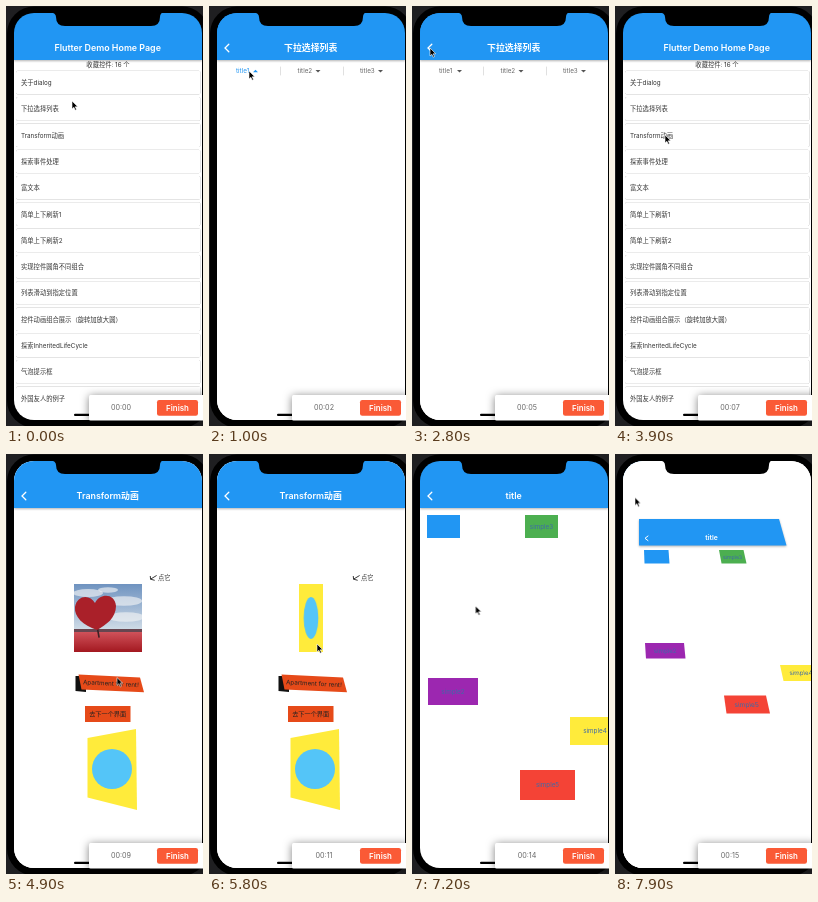
Animation, 197 px wide and 420 px high, one loop 8 s. Source, as an HTML page:

```html
<!DOCTYPE html>
<html lang="zh-CN">
<head>
<meta charset="utf-8">
<title>Widget demo</title>
<style>
  html, body { margin: 0; width: 100%; height: 100%; overflow: hidden; background: #1f1f21; }
  #stage { display: block; width: 197px; height: 420px; }
  text { font-family: Inter, "Noto Sans CJK SC", "Noto Sans CJK", sans-serif; white-space: pre; }
  .bar { filter: drop-shadow(0 1px 1px rgba(0, 0, 0, .3)); }
  .card { filter: drop-shadow(0 .7px .7px rgba(0, 0, 0, .42)); }
  .panel { filter: drop-shadow(0 1px 4px rgba(0, 0, 0, .5)); }
</style>
</head>
<body>
<svg id="stage" viewBox="0 0 197 420"></svg>
<script>
const LOOP = 8000, STEP = 100;
const BLUE = '#2196f3', YELLOW = '#ffeb3b', ORANGE = '#e64a19', SKY = '#54c5f8';

// Drawing helpers; text is placed by its vertical centre.
const text = (x, y, s, { size = 6.3, fill = '#333', anchor = 'start', weight = 400, more = '' } = {}) =>
  `<text x="${x}" y="${y + size * .36}" font-size="${size}" fill="${fill}" text-anchor="${anchor}" font-weight="${weight}" ${more}>${s}</text>`;
const mid = (x, y, s, opts) => text(x, y, s, { anchor: 'middle', ...opts });
const rect = (x, y, w, h, fill, more = '') =>
  `<rect x="${x}" y="${y}" width="${w}" height="${h}" fill="${fill}" ${more}/>`;
const poly = (points, fill, more = '') => `<polygon points="${points}" fill="${fill}" ${more}/>`;
const line = (d, color, width = 1) =>
  `<path d="${d}" fill="none" stroke="${color}" stroke-width="${width}" stroke-linecap="round"/>`;
const group = (id, body) => `<g id="${id}">${body}</g>`;
const blank = rect(8, 7, 188, 407, '#fff');

function header(title, back = true) {
  return rect(8, 7, 188, 47, BLUE, 'class="bar"') +
    mid(101.7, 42, title, { size: 8.9, fill: '#fff', weight: 600 }) +
    (back ? line('M19.8 38.2L16 42L19.8 45.8', '#fff', 1.3) : '');
}

function homePage() {
  const items = ['关于dialog', '下拉选择列表', 'Transform动画', '探索事件处理', '富文本', '简单上下刷新1',
    '简单上下刷新2', '实现控件圆角不同组合', '列表滑动到指定位置', '控件动画组合展示（旋转加放大圆）',
    '探索InheritedLifeCycle', '气泡提示框', '外国友人的例子'];
  return blank + mid(102, 59, '收藏控件: 16 个') +
    items.map((label, i) => {
      const y = 76.8 + i * 26.3;
      return rect(10, y - 12, 184.5, 23.6, '#fff', 'rx="1.8" class="card"') + text(15, y, label);
    }).join('') + header('Flutter Demo Home Page', false);
}

function cells(top, labels, picked) {
  return labels.map((label, i) => {
    const x = i % 2 ? 104 : 12, y = top + (i >> 1) * 33.2;
    const on = picked.includes(i);
    return rect(x, y, 88, 29, '#fff', `stroke="${on ? '#6bb3e0' : '#999'}" stroke-width=".7"`) +
      mid(x + 44, y + 14.7, label, { fill: on ? '#3a9fdc' : '#888' });
  }).join('');
}

function choicePage() {
  const series = (name, n) => ['全部', ...Array.from({ length: n }, (_, i) => name + (i + 1))];
  const arrow = (x, up) => up ? poly(`${x - 2.5},66.3 ${x + 2.5},66.3 ${x},63.7`, BLUE)
    : poly(`${x - 2.5},63.9 ${x + 2.5},63.9 ${x},66.5`, '#555');
  const tabs = [27, 88.5, 151].map((x, i) =>
    text(x, 65, 'title' + (i + 1), { fill: '#666' }) + arrow(x + 20.5)).join('');
  const panel = rect(8, 75, 188, 339, '#fff') +
    text(15, 88, '选择1', { size: 7.2 }) + cells(104, series('问题', 8), [5, 6, 7]) +
    text(15, 282.5, '选择2', { size: 7.2 }) + cells(299, series('测试', 5), [4, 5]) +
    rect(8, 391.5, 188, 23, '#fff') + mid(55, 403, '重置');
  return blank + tabs +
    group('openTab', rect(24, 58, 30, 14, '#fff') + text(27, 65, 'title1', { fill: BLUE }) + arrow(46.5, true)) +
    line('M71.5 61V69M134.5 61V69', '#ccc', .6) +
    `<svg x="8" y="75" width="188" height="339" viewBox="8 75 188 339">${group('panel', panel)}</svg>` +
    header('下拉选择列表');
}

function photo() {
  const cloud = (x, y, w) => `<ellipse cx="${x}" cy="${y}" rx="${w}" ry="${w * .27}" fill="#f1f3f5" opacity=".65"/>`;
  return `<svg x="68" y="130" width="68" height="68">
    ${rect(0, 0, 68, 50, 'url(#sky)')}
    ${cloud(14, 9, 15)}${cloud(50, 17, 18)}${cloud(52, 33, 18)}${cloud(34, 6, 10)}
    ${rect(0, 45, 68, 4, '#674650')}${rect(0, 48, 68, 20, 'url(#field)')}
    ${line('M23 42L25 53', '#3d2024', 1.6)}
    <path d="M23 46C9 41 0 33 1 23C3 11 16 10 21 19C26 9 41 9 42 22C42 34 32 41 23 46Z" fill="#aa2029"/>
  </svg>`;
}

const hint = line('M150.3 121.7L144.8 125M144.3 122.4L144.6 125.2L148.3 126.2', '#222', .9) + text(152, 124, '点它');

function transformPage() {
  return blank + hint + group('photo', photo()) +
    group('flip', rect(68, 130, 68, 68, YELLOW) + `<circle cx="102" cy="164" r="21" fill="${SKY}"/>`) +
    poly('69.5,222 80,222 80,238 69.5,237', '#111') +
    poly('72.5,220.5 134,223.5 138,238.3 75.5,235.5', ORANGE) +
    mid(105, 229.4, 'Apartment for rent!', { size: 6.2, fill: '#222', more: 'transform="rotate(3 105 229)"' }) +
    rect(79, 252, 45.5, 16, ORANGE) + mid(101.7, 260, '去下一个界面', { fill: '#222', size: 6.2 }) +
    poly('81.5,284 130,275 131,356 81.5,343.5', YELLOW) + `<circle cx="106" cy="315" r="20" fill="${SKY}"/>` +
    header('Transform动画');
}

function crossing() {
  return blank + line('M25 144.5L12 150M8 145L12 152L20 152', '#222', 1.6) +
    text(30, 149, '点它', { size: 13.2, fill: '#222' }) +
    poly('8,163 58,206 8,206', YELLOW) + `<circle cx="20" cy="195" r="8" fill="${SKY}"/>` +
    poly('8,213.5 66,214 73,218.3 8,217.3', '#d9481c') +
    poly('29,221 67,221 73,225 37,225', '#d9481c') +
    poly('46,226 77,226 88,236 62,236', YELLOW) + '<circle cx="69" cy="231" r="3.6" fill="#54c5f8"/>' +
    poly('128,212.5 166.5,212.5 163,217 129.5,217', '#8e24aa') +
    poly('126,234 143,234 141,236 124,236', BLUE) + poly('178,234 195,234 192,236 174,236', '#4caf50') +
    rect(122, 236.5, 74, 4.5, BLUE, 'class="bar"') + line('M121.8 241V268', '#eee', .7);
}

const labelBlue = '#3f6aa8';
function nextPage() {
  const box = (x, y, w, h, fill, s) => rect(x, y, w, h, fill) + mid(x + w / 2, y + h / 2, s, { fill: labelBlue });
  return box(15, 61, 33, 23, BLUE, '') + box(113, 61, 33, 23, '#4caf50', 'simple3') +
    box(16, 224, 50, 27, '#9c27b0', 'simple2') + box(158, 263, 50, 28, YELLOW, 'simple4') +
    box(108, 316, 55, 30, '#f44336', 'simple5') + header('title');
}

function tiltedPage() {
  const label = (x, y, s, size) =>
    mid(0, 0, s, { size, fill: labelBlue, more: `transform="translate(${x} ${y}) skewX(10)"` });
  return blank + poly('24,65 164,65 171.5,91.5 24,91.5', BLUE, 'class="bar"') +
    line('M33 82L30 84.3L33 86.6', '#fff', 1) + mid(96.5, 84, 'title', { size: 6.8, fill: '#fff', weight: 600 }) +
    poly('29,96 53.5,96 54.5,109.5 29.5,109.5', BLUE) +
    poly('104,96 128.5,96 131.5,109.5 106.5,109.5', '#4caf50') + label(117.5, 102.7, 'simple3', 5.2) +
    poly('30,189 69,189 70.5,204.5 31,204.5', '#9c27b0') + label(50, 196.7, 'simple2', 6.2) +
    poly('165,211 200,211 203,227 168.5,227', YELLOW) + label(186, 219, 'simple4', 6.2) +
    poly('109,241.5 151,241.5 155,259.5 111.5,259.5', '#f44336') + label(131.5, 250.5, 'simple5', 6.6);
}

const stage = document.getElementById('stage');
stage.innerHTML = `
  <defs>
    <clipPath id="screen">${rect(8, 7, 188, 407, '#fff', 'rx="20"')}</clipPath>
    <linearGradient id="sky" x2="0" y2="1"><stop stop-color="#6f93c0"/><stop offset="1" stop-color="#d8e2ea"/></linearGradient>
    <linearGradient id="field" x2="0" y2="1"><stop stop-color="#d0525a"/><stop offset="1" stop-color="#a31820"/></linearGradient>
  </defs>
  ${rect(1, 0.5, 202, 421, '#000', 'rx="27"')}
  <g clip-path="url(#screen)">
    ${group('home', homePage())}
    ${group('choice', choicePage())}
    ${group('cover', blank)}
    ${group('transform', transformPage())}
    ${group('crossing', crossing())}
    ${group('nextWrap', blank + group('next', nextPage()))}
    ${group('tilted', tiltedPage())}
    ${rect(68, 407.8, 68, 2.2, '#000', 'rx="1.1"')}
  </g>
  <path d="M44 6H158Q154 7 154 11Q154 20 145 20H59Q50 20 50 11Q50 7 44 6Z" fill="#000"/>
  <g class="panel">${rect(83, 389, 118, 25.5, '#fff', 'rx="1.5"')}</g>
  ${mid(115, 401.8, '00:00', { size: 7.2, fill: '#666', more: 'id="clock"' })}
  ${rect(151, 394, 41, 15.8, '#fa5a36', 'rx="2.2"')}
  ${mid(171.5, 401.8, 'Finish', { size: 7.9, fill: '#fff', weight: 600 })}
  ${group('cursor', '<path d="M0 0V8L1.9 6.3L3.2 9.2L4.5 8.6L3.2 5.8H5.8Z" fill="#000" stroke="#fff" stroke-width=".6"/>')}`;

// Each track is a list of [ms, value]; the ends are held.
const tracks = [];
function track(id, prop, rows, easing = 'linear') {
  const all = [[0, rows[0][1]], ...rows, [LOOP, rows.at(-1)[1]]];
  const frames = all.map(([ms, value]) => ({ offset: ms / LOOP, [prop]: value, easing }));
  const anim = document.getElementById(id).animate(frames, { duration: LOOP, fill: 'both' });
  anim.pause();
  tracks.push(anim);
}
const show = (id, from, to = LOOP) =>
  track(id, 'opacity', [[from, 0], [from, 1], [to, 1], ...(to < LOOP ? [[to, 0]] : [])]);
const shift = (x, y = 0) => `translate(${x}px, ${y}px)`;
const turn = s => `translateX(102px) scaleX(${s}) translateX(-102px)`;
const IDENTITY = 'matrix(1, 0, 0, 1, 0, 0)';

track('home', 'transform', [[400, shift(0)], [700, shift(-62)], [2900, shift(-62)], [3200, shift(0)],
  [4000, shift(0)], [4300, shift(-62)]], 'ease-out');
track('choice', 'transform', [[400, shift(190)], [700, shift(0)], [2900, shift(0)], [3200, shift(190)]], 'ease-out');
track('panel', 'transform', [[1000, shift(0, -340)], [1300, shift(0)], [1950, shift(0)], [2300, shift(0, -340)]], 'ease-out');
show('openTab', 1000, 2000);
show('cover', 6600);
track('transform', 'transform', [[4000, 'matrix(1, 0, 0, 1, 190, 0)'], [4300, IDENTITY], [6600, IDENTITY],
  [6700, 'matrix(1, 0, .35, .6, -90, 80)']]);
track('photo', 'transform', [[5300, turn(1)], [5650, turn(0)]], 'ease-in');
track('flip', 'transform', [[5650, turn(0)], [5800, turn(.35)], [6100, turn(1)]]);
show('crossing', 6800, 6900);
show('nextWrap', 6900, 7900);
track('next', 'transform', [[6900, 'matrix(.8, 0, .2, .57, 10, 60)'], [7100, IDENTITY], [7700, IDENTITY],
  [7900, 'matrix(.77, 0, .25, .57, 16, 61)']]);
show('tilted', 7900);
track('cursor', 'transform', [[0, 66, 95], [300, 52, 103], [500, 52, 103], [900, 40, 65], [1300, 40, 65],
  [1900, 101.5, 62.5], [2300, 101.5, 62.5], [2800, 18, 42], [3300, 18, 42], [3900, 50, 129], [4200, 50, 129],
  [4900, 111, 223.5], [5300, 108, 190], [5900, 108, 190], [6400, 107, 260.5], [6900, 107, 260.5],
  [7500, 20, 43.5]].map(([ms, x, y]) => [ms, shift(x, y)]), 'ease-in-out');

const clock = document.getElementById('clock');
function tick() {
  const t = Math.floor(performance.now() % LOOP / STEP) * STEP;
  for (const anim of tracks) anim.currentTime = t;
  clock.textContent = '00:' + String(Math.floor(t / 500)).padStart(2, '0');
  requestAnimationFrame(tick);
}
tick();
</script>
</body>
</html>
```
